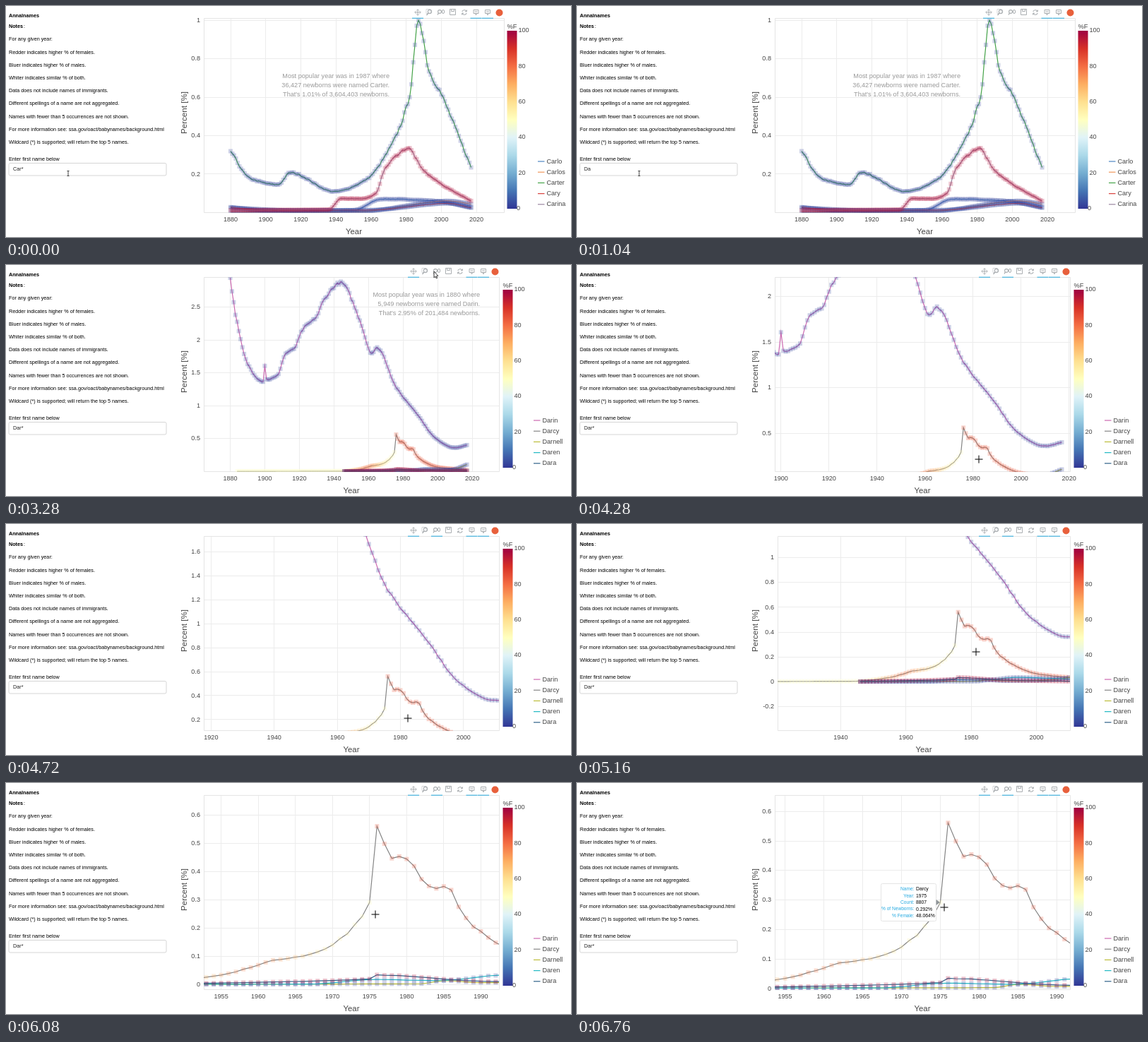
Recreate the animation shown at these times as an HTML page with a canvas. Size 800 px wide and 327 px high, loop 6800 ms.

```html
<!DOCTYPE html>
<html lang="en">
<head>
<meta charset="utf-8">
<title>Name popularity chart</title>
<style>
html, body { margin: 0; width: 100%; height: 100%; overflow: hidden; background: #fff; }
canvas { display: block; }
</style>
</head>
<body>
<canvas id="stage" width="800" height="327"></canvas>
<script>
const ctx = document.getElementById('stage').getContext('2d');
const LOOP = 6800, SWITCH = 2520, WHEEL_ON = 3400, TIP = 6600, TYPING = 680;
const LEFT = 280, TOP = 17, BOTTOM = 292, GREY = '#aaaeb1';
const FONT = '"Liberation Sans", Arial, sans-serif';
const PALETTE = ['#313695', '#4575b4', '#74add1', '#abd9e9', '#e0f3f8', '#ffffbf',
  '#fee090', '#fdae61', '#f46d43', '#d73027', '#9e0142'];

const clamp = v => Math.max(0, Math.min(1, v));
const ease = k => k * k * (3 - 2 * k);

let seed = 7;
const random = () => (seed = seed * 16807 % 2147483647) / 2147483647;

// Monotone cubic through a few key points, flat at peaks and dips
function curve(keys) {
  const slope = i => (keys[i + 1][1] - keys[i][1]) / (keys[i + 1][0] - keys[i][0]);
  const tangent = i => {
    if (i === 0) return slope(0);
    if (i === keys.length - 1) return slope(i - 1);
    const a = slope(i - 1), b = slope(i);
    return a * b <= 0 ? 0 : 2 * a * b / (a + b);
  };
  return x => {
    let i = 0;
    while (i < keys.length - 2 && keys[i + 1][0] <= x) i++;
    const [xa, ya] = keys[i], [xb, yb] = keys[i + 1], w = xb - xa, k = (x - xa) / w, s = ease(k);
    return ya + (yb - ya) * s + w * k * (1 - k) * ((1 - k) * tangent(i) - k * tangent(i + 1));
  };
}

function heat(pct) {
  const s = Math.min(pct / 10, 9.999), i = Math.floor(s), k = s - i;
  const part = (hex, c) => parseInt(hex.substr(1 + c * 2, 2), 16);
  return `rgb(${[0, 1, 2].map(c =>
    Math.round(part(PALETTE[i], c) * (1 - k) + part(PALETTE[i + 1], c) * k))})`;
}

function series(name, color, female, keys, noise = .04) {
  const value = curve(keys), points = [];
  for (let year = keys[0][0]; year <= 2017; year++)
    points.push({ year, value: value(year) * (1 + noise * (random() - .5)), fill: heat(female(year)) });
  return { name, color, points };
}
const boys = () => 2, girls = () => 97;
const mixed = year => year > 1975 ? 84 : 50 + 28 * Math.exp(-(((year - 1959) / 9) ** 2));

// view: pixel position of 1880 and of 0 %, pixels per year and per percent
const firstSet = {
  right: 705,
  view: { x: 318, y: 292.3, sx: 2.486, sy: 272 },
  list: [
    series('Carlo', '#4e86c4', boys, [[1880, .025], [1920, .01], [1950, .012], [1966, .07], [1994, .062], [2017, .027]]),
    series('Carlos', '#f0965a', boys, [[1880, .002], [1950, .003], [2005, .06], [2017, .043]]),
    series('Carter', '#45a349', boys, [[1880, .32], [1891, .178], [1907, .145], [1914, .207], [1939, .109],
      [1957, .17], [1970, .325], [1982, .61], [1985, .86], [1987, 1.01], [1993, .74], [1999, .635], [2017, .235]]),
    series('Cary', '#d8413d', boys, [[1880, .028], [1900, .011], [1960, .013], [2004, .047], [2017, .024]]),
    series('Carina', '#9a86a0', girls, [[1880, .012], [1936, .015], [1943, .073], [1955, .072], [1963, .1],
      [1967, .212], [1978, .322], [1981, .335], [1989, .228], [2000, .148], [2017, .06]])
  ],
  note: ['Most popular year was in 1987 where', '36,427 newborns were named Carter.',
    "That's 1.01% of 3,604,403 newborns."],
  anchor: [1970.5, .612]
};
const secondSet = {
  right: 698,
  view: { x: 317.5, y: 292.2, sx: 2.447, sy: 93 },
  list: [
    series('Darin', '#cb68b0', boys, [[1880, 2.95], [1883, 2.4], [1890, 1.64], [1899, 1.37], [1900, 1.61],
      [1901, 1.4], [1907, 1.45], [1912, 1.79], [1917, 1.87], [1922, 2.16], [1930, 2.36], [1934, 2.6], [1944, 2.87],
      [1955, 2.3], [1962, 1.8], [1965, 1.88], [1976, 1.28], [1988, .88], [1999, .5], [2010, .36], [2017, .4]], .015),
    series('Darcy', '#858585', mixed, [[1884, .001], [1944, .004], [1955, .034], [1962, .085], [1968, .115],
      [1974, .238], [1975, .292], [1976, .565], [1978, .445], [1979, .462], [1984, .335], [1985, .355],
      [1988, .235], [1992, .15], [2000, .064], [2017, .02]]),
    series('Darnell', '#bcbd3a', boys, [[1946, .001], [1982, .003], [1985, .014], [1990, .007], [2000, .01],
      [2008, .025], [2017, .105]]),
    series('Daren', '#22b9c4', boys, [[1946, .001], [1967, .002], [1976, .018], [1984, .014], [1994, .035], [2017, .01]]),
    series('Dara', '#2f6188', girls, [[1946, .001], [1975, .02], [1976, .034], [1990, .012], [2017, .001]])
  ],
  note: ['Most popular year was in 1880 where', '5,949 newborns were named Darin.',
    "That's 2.95% of 201,484 newborns."],
  anchor: [2024.5, 2.404]
};

const GESTURES = [
  { from: 3740, to: 4240, zoom: 1.389, at: [566, 265] },
  { from: 4400, to: 4760, zoom: 1.359, at: [568, 277] },
  { from: 4840, to: 5120, drag: [0, -88.8] },
  { from: 5220, to: 5760, zoom: 2.275, at: [565, 181] },
  { from: 5840, to: 6040, drag: [18, 8.3] },
  { from: 6160, to: 6320, zoom: 1.046, at: [523, 166] }
];

// Pointer stops: arrival, departure, x, y
const STOPS = [[0, 1640, 88, 237], [2120, 2640, 505, 152], [3160, 3420, 607, 13], [3700, 4840, 569, 275],
  [5120, 5800, 565, 181], [6040, 6320, 523, 186], [6560, LOOP, 520, 176]];

const NOTES = ['For any given year:', 'Redder indicates higher % of females.', 'Bluer indicates higher % of males.',
  'Whiter indicates similar % of both.', 'Data does not include names of immigrants.',
  'Different spellings of a name are not aggregated.', 'Names with fewer than 5 occurrences are not shown.',
  'For more information see: ssa.gov/oact/babynames/background.html',
  'Wildcard (*) is supported; will return the top 5 names.'];

function text(s, x, y, size = 9.1, color = '#444', align = 'left', weight = '') {
  ctx.font = `${weight} ${size}px ${FONT}`;
  ctx.fillStyle = color;
  ctx.textAlign = align;
  ctx.fillText(s, x, y + size * .29);
}
function path(points, color, width = 1) {
  ctx.strokeStyle = color;
  ctx.lineWidth = width;
  ctx.beginPath();
  points.forEach(([x, y]) => ctx.lineTo(x, y));
  ctx.stroke();
}
function box(x, y, w, h, color, radius = 0) {
  ctx.strokeStyle = color;
  ctx.lineWidth = 1;
  ctx.beginPath();
  ctx.roundRect(x, y, w, h, radius);
  ctx.stroke();
}
function ring(x, y, r, from = 0, to = 7) {
  ctx.strokeStyle = GREY;
  ctx.lineWidth = 1.1;
  ctx.beginPath();
  ctx.arc(x, y, r, from, to);
  ctx.stroke();
}
function cross(x, y, r, color, width) {
  path([[x - r, y], [x + r, y]], color, width);
  path([[x, y - r], [x, y + r]], color, width);
}

function sidebar(t) {
  const line = (s, y, weight) => text(s, 4, y, 7.22, '#000', 'left', weight);
  line('Annalnames', 14, 'bold');
  line('Notes', 29, 'bold');
  text(':', 25, 29, 7.22, '#000');
  NOTES.forEach((s, i) => line(s, 47.3 + i * 18.2));
  line('Enter first name below', 216.5);
  box(4, 222.5, 223, 17.5, '#d6d6d6', 2);
  const typed = t < TYPING ? 'Car*' : 'Dar*'.slice(0, Math.floor((t - TYPING) / 180));
  text(typed, 10, 231.3, 7.22, '#222');
}

function toolbar(t, dx) {
  const y = 9, cx = i => 583 + dx + i * 16.5;
  const icons = [
    x => {
      cross(x, y, 4, GREY);
      for (const s of [-1, 1]) {
        path([[x - 1.7, y + 2.6 * s], [x, y + 4.3 * s], [x + 1.7, y + 2.6 * s]], GREY);
        path([[x + 2.6 * s, y - 1.7], [x + 4.3 * s, y], [x + 2.6 * s, y + 1.7]], GREY);
      }
    },
    x => {
      box(x - 4.5, y - 4.5, 6, 6, '#d5d7d9');
      ring(x + .5, y - 1, 2.6);
      path([[x - 1.5, y + 1], [x - 4, y + 4]], GREY, 1.4);
    },
    x => {
      ring(x - 2, y - 1, 2.4);
      path([[x - 3.5, y + 1], [x - 5, y + 3.5]], GREY, 1.4);
      box(x + 1.5, y - 3.5, 3, 5, GREY, 1.5);
    },
    x => {
      box(x - 4, y - 4.5, 8, 8, GREY);
      box(x - 2, y - 4.5, 4, 3, GREY);
    },
    x => {
      ring(x, y, 3.3, 3.4, 5.8);
      ring(x, y, 3.3, .3, 2.7);
      path([[x + 3.5, y - 3.5], [x + 3.2, y - 1], [x + 1, y - 1.3]], GREY);
      path([[x - 3.5, y + 3.5], [x - 3.2, y + 1], [x - 1, y + 1.3]], GREY);
    }
  ];
  const bubble = x => {
    box(x - 3.5, y - 3.5, 7, 5, GREY);
    path([[x - 2, y - 1], [x + 2, y - 1]], GREY);
    path([[x - 1, y + 2], [x, y + 4], [x + 1, y + 2]], GREY);
  };
  [...icons, bubble, bubble].forEach((icon, i) => icon(cx(i)));
  ctx.fillStyle = '#e8603c';
  ctx.beginPath();
  ctx.arc(cx(7), 9.5, 5, 0, 7);
  ctx.fill();
  for (const i of t < WHEEL_ON ? [0, 5, 6] : [0, 2, 5, 6])
    path([[cx(i) - 8, 17.3], [cx(i) + 8, 17.3]], '#45b3dd', 1.2);
}

function viewAt(t, set) {
  const v = { ...set.view };
  for (const { from, to, zoom = 1, at = [0, 0], drag = [0, 0] } of GESTURES) {
    const k = clamp((t - from) / (to - from)), f = zoom ** k;
    v.x = at[0] + (v.x - at[0]) * f + drag[0] * k;
    v.y = at[1] + (v.y - at[1]) * f + drag[1] * k;
    v.sx *= f;
    v.sy *= f;
  }
  return v;
}

// Round tick values, as near to six intervals as possible
function ticks(from, to) {
  const miss = s => Math.abs((to - from) / s - 6);
  let step = 1;
  for (let e = -3; e < 4; e++) for (const m of [1, 2, 5])
    if (miss(m * 10 ** e) < miss(step)) step = m * 10 ** e;
  const out = [];
  for (let i = Math.ceil(from / step); i * step <= to; i++) out.push(+(i * step).toFixed(6));
  return out;
}

function chart(t, set) {
  const v = viewAt(t, set), { right } = set;
  const px = year => v.x + (year - 1880) * v.sx, py = pct => v.y - pct * v.sy;
  const year = x => 1880 + (x - v.x) / v.sx, pct = y => (v.y - y) / v.sy;
  const yTicks = ticks(pct(BOTTOM), pct(TOP)), left = yTicks[0] < 0 ? LEFT + 4 : LEFT;
  const snap = p => Math.floor(p) + .5;
  for (const n of ticks(year(left), year(right))) {
    path([[snap(px(n)), TOP], [snap(px(n)), BOTTOM]], '#ececec');
    text(n, px(n), 302.3, 9.1, '#444', 'center');
  }
  for (const n of yTicks) {
    path([[left, snap(py(n))], [right, snap(py(n))]], '#ececec');
    text(n, left - 5, py(n), 9.1, '#444', 'right');
  }
  box(left + .5, TOP + .5, right - left, BOTTOM - TOP, '#e5e5e5');
  text('Year', (left + right) / 2, 319.7, 11.3, '#444', 'center');
  ctx.save();
  ctx.translate(253, 151);
  ctx.rotate(-Math.PI / 2);
  text('Percent [%]', 0, 0, 11.6, '#444', 'center');
  ctx.restore();

  ctx.save();
  ctx.beginPath();
  ctx.rect(left, TOP, right - left, BOTTOM - TOP + 1);
  ctx.clip();
  set.note.forEach((s, i) =>
    text(s, px(set.anchor[0]), py(set.anchor[1]) + (i - 2) * 13.3, 9.15, '#999', 'right'));
  for (const { color, points } of set.list) {
    path(points.map(p => [px(p.year), py(p.value)]), color, 1.2);
    ctx.globalAlpha = .25;
    for (const p of points) {
      ctx.fillStyle = p.fill;
      ctx.fillRect(px(p.year) - 3, py(p.value) - 3, 6, 6);
    }
    ctx.globalAlpha = 1;
  }
  ctx.restore();
}

function keys(set, dx) {
  const bar = ctx.createLinearGradient(0, 287, 0, 35);
  PALETTE.forEach((c, i) => bar.addColorStop(i / 10, c));
  ctx.fillStyle = bar;
  ctx.fillRect(709.5 + dx, 35, 14, 252);
  text('%F', 709.5 + dx, 29, 9.2);
  for (let n = 0; n <= 100; n += 20) text(n, (n ? 725.5 : 723) + dx, 286.5 - n * 2.52);
  set.list.forEach(({ name, color }, i) => {
    const y = 220 + i * 15.2;
    path([[753 + dx, y], [762.5 + dx, y]], color, 1.2);
    text(name, 765.5 + dx, y);
  });
}

function tooltip() {
  ctx.fillStyle = '#fff';
  ctx.fillRect(430, 142, 78, 53);
  box(430.5, 142.5, 78, 53, '#e5e5e5', 2);
  ctx.fillStyle = '#909599';
  ctx.beginPath();
  [[508.5, 165], [514, 169], [508.5, 173]].forEach(p => ctx.lineTo(...p));
  ctx.fill();
  const rows = { Name: 'Darcy', Year: '1975', Count: '8807', '% of Newborns': '0.292%', '% Female': '48.064%' };
  Object.entries(rows).forEach(([label, value], i) => {
    const y = 150.5 + i * 9.35;
    text(label + ':', 477.5, y, 6.6, '#26aae1', 'right');
    text(value, 480, y, 6.8, '#000');
  });
}

function cursor(t) {
  const i = STOPS.findLastIndex(s => s[0] <= t), a = STOPS[i], b = STOPS[i + 1] || a;
  const k = ease(clamp((t - a[1]) / (b[0] - a[1] || 1)));
  const x = a[2] + (b[2] - a[2]) * k, y = a[3] + (b[3] - a[3]) * k;
  if (x < 228 && y > 220) {
    path([[x, y - 3.5], [x, y + 3.5]], '#444');
    for (const s of [-3.5, 3.5]) path([[x - 1.5, y + s], [x + 1.5, y + s]], '#444');
  } else if (x > LEFT && y > TOP) {
    cross(x, y, 5.5, '#111', 1.1);
  } else {
    ctx.beginPath();
    [[-1, -4], [-1, 5], [1, 3.3], [2.4, 6], [3.6, 5.4], [2.4, 2.8], [4.8, 2.4]]
      .forEach(p => ctx.lineTo(x + p[0], y + p[1]));
    ctx.closePath();
    ctx.fillStyle = '#fff';
    ctx.fill();
    ctx.strokeStyle = '#333';
    ctx.lineWidth = 1;
    ctx.stroke();
  }
}

function draw(now) {
  const t = now % LOOP, later = t >= SWITCH;
  const set = later ? secondSet : firstSet, dx = later ? -6 : 0;
  ctx.fillStyle = '#fff';
  ctx.fillRect(0, 0, 800, 327);
  sidebar(t);
  chart(t, set);
  toolbar(t, dx);
  keys(set, dx);
  if (t >= TIP) tooltip();
  cursor(t);
  requestAnimationFrame(draw);
}
requestAnimationFrame(draw);
</script>
</body>
</html>
```
